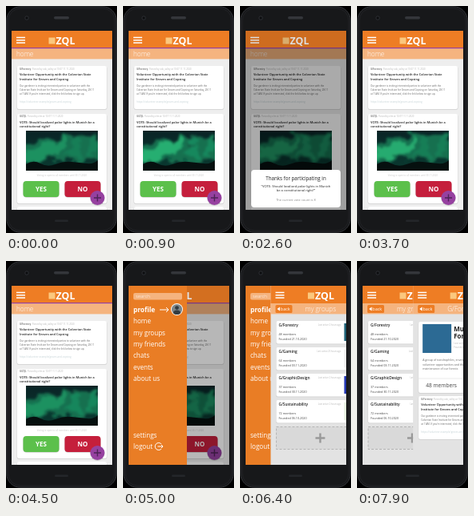
An HTML page that plays this animation: 139x284 px, repeating every 8 s.

```html
<!DOCTYPE html>
<html lang="en">
<head>
<meta charset="utf-8">
<style>
html, body { margin: 0; width: 100%; height: 100%; overflow: hidden; background: #000; }
svg { display: block; }
text { font-family: "Open Sans", "Noto Sans", sans-serif; white-space: pre; }
</style>
</head>
<body>
<svg id="stage" width="139" height="284" viewBox="0 0 139 284"></svg>
<script>
const LOOP = 8000;
const ORANGE = '#ee7d24', PALE = '#f5b47f', PURPLE = '#9641a0', INK = '#222', GREY = '#666', FAINT = '#b5b5b5';

const rect = (x, y, w, h, fill, more = '') =>
  `<rect x="${x}" y="${y}" width="${w}" height="${h}" fill="${fill}" ${more}/>`;
const circle = (x, y, r, fill, more = '') =>
  `<circle cx="${x}" cy="${y}" r="${r}" fill="${fill}" ${more}/>`;
const path = (d, fill, more = '') => `<path d="${d}" fill="${fill}" ${more}/>`;
const line = (d, stroke, width) => path(d, 'none', `stroke="${stroke}" stroke-width="${width}"`);
const text = (x, y, size, fill, str, weight = 400, anchor = 'start') =>
  `<text x="${x}" y="${y}" font-size="${size}" fill="${fill}" font-weight="${weight}" text-anchor="${anchor}">${str}</text>`;
const lines = (x, y, step, size, fill, rows, weight) =>
  rows.map((row, i) => text(x, y + i * step, size, fill, row, weight)).join('');
const card = (y, h) =>
  rect(13.6, y + .7, 112.8, h, '#cfcfcf', 'rx="2"') + rect(14, y, 112, h, '#fff', 'rx="2"');

const header = title =>
  rect(7, 31, 126, 22, ORANGE) + rect(7, 53, 126, 13.4, PALE) +
  [38.7, 42, 45.3].map(y => rect(13, y, 11, 1.5, '#fff')).join('') +
  rect(53.5, 39.5, 8, 8, '#fbc87e') + text(62.5, 47.6, 12.4, '#fff', 'ZQL', 700) + title;

const page = (background, title, content) => rect(7, 31, 126, 224, background) + content + header(title);

const backTitle = title =>
  rect(13, 55, 21, 10, ORANGE, 'rx="1.5"') + path('M15 60L18.5 57.5V62.5Z', '#fff') +
  text(19.3, 62, 5.5, '#fff', 'back') + text(50, 63, 8.2, '#fff', title, 300);

const postMeta = (y, group, rest) =>
  text(17, y, 2.8, GREY, `<tspan font-weight="600">${group}</tspan><tspan fill="${FAINT}">  ${rest}</tspan>`);

const volunteerPost = y => card(y, 54) +
  postMeta(y + 5, 'G/Forestry', 'Posted by oak_valley at 10:07 11.11.2020') +
  lines(17, y + 12.3, 5.6, 3.95, INK, ['Volunteer Opportunity with the Calverian State', 'Institute for Groves and Copsing'], 600) +
  lines(17, y + 26, 5, 3, GREY, [
    'Our gardener is inviting interested parties to volunteer with the',
    'Calverian State Institute for Groves and Copsing on Saturday, 28.11',
    'at 7 AM. If you’re interested, click the link below to sign up.']) +
  text(17, y + 46, 3, '#c2d0d4', 'https://volunteer.example/groves-and-copsing');

const votePost = y => card(y, 112) +
  postMeta(y + 4.3, 'G/ZQL', 'Posted by elm at 10:07 11.11.2020') +
  lines(17, y + 11.5, 5.4, 3.95, INK, ['VOTE: Should localized polar lights in Munich be a', 'constitutional right?'], 600);

const button = (x, fill, label) =>
  rect(x, 219.6, 45, 20, '#bbb', 'rx="4"') + rect(x, 219, 45, 20, fill, 'rx="4"') +
  text(x + 22.5, 232, 8, '#fff', label, 700, 'middle');

const home = page('#eeeeee', rect(7, 52, 126, 1.2, PURPLE) + text(13, 63, 8.2, '#fff', 'home', 300),
  volunteerPost(75) + votePost(135) +
  `<g clip-path="url(#photo)">${rect(25, 156, 90, 50, 'url(#night)')}
    <g filter="url(#wisps)"><path id="glow" fill="#12704f"/><path id="band" fill="#2fc27c"/><path id="ray" fill="#22a06c"/></g>
    ${path('M25 206V198Q34 192 43 197T62 198T82 195T101 197T115 193V206Z', '#06100f')}</g>` +
  text(70, 213, 2.9, '#c8c8c8', 'Voting is open to all members until 30.11.2020', 400, 'middle') +
  button(21.5, '#5cc04b', 'YES') + button(73.5, '#c51f3c', 'NO') + card(251, 10)) +
  circle(114.5, 240.8, 9.2, '#999', 'opacity=".4"') + circle(114.5, 240, 9, PURPLE) +
  line('M110 240H119M114.5 235.5V244.5', '#4e2457', 1.4);

const menuItems = ['home', 'my groups', 'my friends', 'chats', 'events', 'about us'];
const menu = rect(7, 31, 73, 224, '#e97d25') +
  rect(13, 40, 61, 8.5, PALE, 'rx="2"') + text(16, 46.2, 6, '#fff', 'search', 300) +
  text(13, 64, 8.3, '#fff', 'profile', 700) + line('M46 61H57M54 58L57 61L54 64', '#fff', 1) +
  circle(67.5, 60.5, 7.5, '#fff') + circle(67.5, 60.5, 6.6, '#7d8588') +
  circle(67.5, 58.6, 2.4, '#333b40') + path('M63 65.2Q63 61.5 67.5 61.5T72 65.2Q67.5 69 63 65.2Z', '#333b40') +
  lines(13, 78.3, 14.3, 8.1, '#fff', menuItems) +
  lines(13, 220.8, 14.3, 8.1, '#fff', ['settings', 'logout']) +
  line('M48 229A4.5 4.5 0 1 0 48 235M43.5 232H50M48 230L50 232L48 234', '#fff', 1);

const groups = [
  ['G/Forestry', 48, '21.10.2020', '2 hours', '#1f6277'],
  ['G/Gaming', 64, '03.11.2020', '26 hours', '#eeeeee'],
  ['G/GraphicDesign', 37, '30.11.2020', '2 hours', '#2438b4'],
  ['G/Sustainability', 72, '06.10.2020', '2 hours', '#e6efe0']];
const groupList = page('#e3e3e3', backTitle('my groups'),
  groups.map(([name, count, date, ago, tint], i) => {
    const y = 75 + 33 * i;
    return card(y, 28.5) + text(17, y + 7, 4.8, INK, name, 600) +
      text(95, y + 6, 2.7, FAINT, `Last active ${ago} ago`, 400, 'end') +
      lines(17, y + 18.3, 5.3, 3.7, '#444', [count + ' members', 'Founded ' + date]) +
      rect(99, y + 3, 22, 22, tint);
  }).join('') +
  rect(14, 207.5, 112, 28, '#d9d9d9', 'stroke="#aaa" stroke-width=".8" stroke-dasharray="3 2"') +
  line('M63 221.5H75M69 215.5V227.5', '#999', 2.4));

const groupPage = page('#e3e3e3', backTitle('G/Forestry'),
  card(76, 89) + rect(19, 79, 36, 36, '#2c6a94') +
  lines(58, 88, 9, 8, INK, ['Munich', 'Forestry'], 700) +
  lines(58, 104, 5, 3, FAINT, ['Last active 2 hours ago', 'Founded 21.10.2020']) +
  lines(19, 125.2, 5.3, 3.5, GREY, ['A group of nondrophiles, environmental', 'volunteer opportunities and the', 'maintenance of our forests']) +
  line('M14 147H126', '#ddd', .6) + text(23, 158, 6.6, '#444', '48 members') +
  volunteerPost(169));

const dialog = rect(14, 205, 112, 47, '#fff', 'rx="4"') +
  text(70, 218, 6.2, INK, 'Thanks for participating in', 500, 'middle') +
  text(70, 226.5, 4.1, INK, '“VOTE: Should localized polar lights in Munich', 400, 'middle') +
  text(70, 232, 4.1, INK, 'be a constitutional right?”', 400, 'middle') +
  text(70, 244, 4, '#888', 'The current vote count is 8', 400, 'middle');

const stage = document.getElementById('stage');
stage.innerHTML = `<defs>
  <clipPath id="screen">${rect(7, 31, 126, 224, '#000')}</clipPath>
  <clipPath id="photo">${rect(25, 156, 90, 50, '#000')}</clipPath>
  <linearGradient id="night" x2="0" y2="1"><stop stop-color="#0a2426"/><stop offset="1" stop-color="#0a3a30"/></linearGradient>
  <filter id="wisps" x="-30%" y="-30%" width="160%" height="160%">
    <feGaussianBlur stdDeviation="2"/>
    <feTurbulence type="fractalNoise" baseFrequency=".05 .07" numOctaves="3" seed="4" result="noise"/>
    <feDisplacementMap in="SourceGraphic" in2="noise" scale="26" xChannelSelector="R" yChannelSelector="G"/>
    <feGaussianBlur stdDeviation="1.4"/>
  </filter></defs>
  ${rect(.8, .8, 137.4, 282.4, '#17181a', 'rx="17" stroke="#34363a" stroke-width="1"')}
  ${rect(3, 3, 133, 278, 'none', 'rx="15" stroke="#26282b" stroke-width=".7"')}
  ${circle(26, 15, 2.2, '#0c0d0f', 'stroke="#3a3d42" stroke-width=".7"')}
  ${rect(60, 13, 19, 3.4, '#34363b', 'rx="1.7"')}${rect(61, 267.5, 17, 2.4, '#24262a', 'rx="1.2"')}
  <g clip-path="url(#screen)">${home}
    <g id="shade">${rect(7, 31, 126, 21.5, '#000', 'opacity=".4"')}${rect(7, 52.5, 126, 202.5, '#000')}</g>
    <g id="dialog">${dialog}</g><g id="menu">${menu}</g>
    <g id="groups">${groupList}</g><g id="group">${groupPage}</g>
  </g>`;

const part = id => document.getElementById(id);
const ease = (t, from, to) => {
  const p = Math.min(1, Math.max(0, (t - from) / (to - from)));
  return (1 - Math.cos(Math.PI * p)) / 2;
};
const move = (id, x, y = 0) => part(id).setAttribute('transform', `translate(${x} ${y})`);

function aurora(t) {
  const a = t / 1000, s = Math.sin(a * 1.5), c = Math.cos(a * 1.1);
  part('glow').setAttribute('d', `M20 ${176 + 3 * s}Q48 ${160 + 4 * c} 68 ${164 + 3 * s}T120 ${158 + 4 * c}V194Q80 ${186 + 4 * s} 20 198Z`);
  part('band').setAttribute('d', `M20 ${184 + 2 * c}Q44 ${180 + 4 * s} 62 ${168 - 3 * s}L${74 + 2 * c} 166Q66 184 50 ${189 + 2 * c}T20 194Z`);
  part('ray').setAttribute('d', `M${74 + 4 * s} 186L${86 + 4 * c} 160H${94 + 4 * c}L${88 + 3 * s} 187ZM${98 + 3 * c} 188L${108 + 3 * s} 160H118L${110 + 3 * c} 188Z`);
  part('band').setAttribute('opacity', .6 - .2 * Math.cos(a * 2.8));
  part('ray').setAttribute('opacity', .5 - .2 * Math.cos(a * 1.7));
}

function draw(now) {
  const t = now % LOOP;
  const thanks = ease(t, 1200, 1600) - ease(t, 3000, 3400);
  const side = ease(t, 4550, 4900);
  aurora(t);
  part('shade').setAttribute('opacity', .33 * thanks + .28 * side);
  move('dialog', 0, 52 * (1 - thanks));
  move('menu', -74 * (1 - side));
  move('groups', 127 * (1 - ease(t, 6000, 6600)));
  move('group', 127 * (1 - ease(t, 7600, 8200)));
  requestAnimationFrame(draw);
}
draw(performance.now());
</script>
</body>
</html>
```
